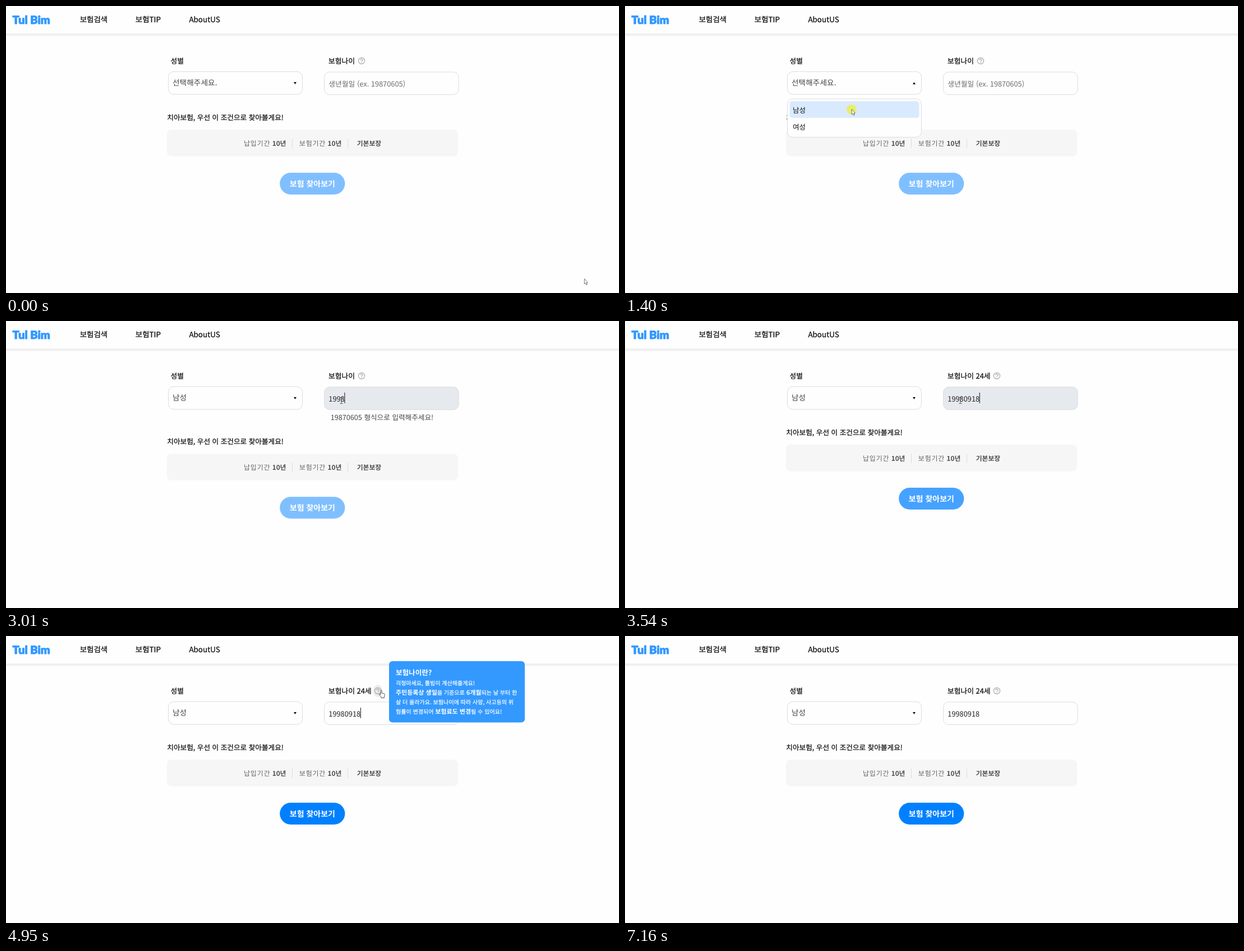
An HTML page for the animation above (7430 ms loop, 1093x513 px).

```html
<!DOCTYPE html>
<html lang="ko">
<head>
<meta charset="utf-8">
<title>보험검색</title>
<style>
  html, body { margin: 0; width: 100%; height: 100%; overflow: hidden; background: #fefefe; }
  svg { display: block; width: 1093px; height: 513px; }
  text {
    font: 12.63px "Noto Sans CJK KR", "Noto Sans KR", sans-serif;
    fill: #111; white-space: pre; text-rendering: geometricPrecision;
  }
  .logo { font: 900 20px Lato, sans-serif; fill: #39f; stroke: #39f; stroke-width: .9; stroke-linejoin: round; }
  .nav, .label, .lead { stroke: #111; stroke-width: .25; }
  .nav { font-size: 13.45px; }
  .label { font-size: 12.8px; }
  .choice { font-size: 13.6px; letter-spacing: .13px; fill: #444; }
  .field { fill: #fefefe; stroke: #dcdcdc; }
  .term { font-size: 12px; letter-spacing: .8px; fill: #666; }
  .value { font-size: 11.8px; font-weight: 700; fill: #4c4c4c; }
  .find { font-size: 14px; font-weight: 700; fill: #fff; text-anchor: middle; }
  #birth { font-size: 12.8px; }
  #hint { fill: #444; }
  #tip text { font-size: 10.06px; fill: #fff; stroke: #fff; stroke-width: .2; }
  #tip .title { font-size: 12.6px; font-weight: 700; stroke: none; }
  #tip tspan { font-size: 11px; font-weight: 700; stroke: none; }
  #tip { transform-origin: 683px 100px; }
</style>
</head>
<body>
<svg viewBox="0 0 1093 513">
  <defs>
    <linearGradient id="shade" x2="0" y2="1">
      <stop stop-color="#e8e8e8"/><stop offset="1" stop-color="#fefefe"/>
    </linearGradient>
  </defs>

  <rect y="49.5" width="1093" height="5.5" fill="url(#shade)"/>
  <text class="logo" x="11.5" y="31.8">Tul Bim</text>
  <text class="nav" x="131.7" y="28.8">보험검색</text>
  <text class="nav" x="230.8" y="28.8">보험TIP</text>
  <text class="nav" x="326.4" y="28.8">AboutUS</text>

  <text class="label" x="293.5" y="102.6">성별</text>
  <rect id="select" class="field" x="289.5" y="117.3" width="239" height="40.7" rx="9.5"/>
  <text id="gender" class="choice" x="296.9" y="142.3"></text>
  <path id="arrow" fill="#111"/>

  <text id="ageLabel" class="label" x="574.9" y="102.6"></text>
  <g id="help">
    <ellipse id="halo" rx="8" ry="11" fill="#000" opacity=".07"/>
    <circle r="5.6" fill="none" stroke="#aaa" stroke-width="1.2"/>
    <path d="M-2-1.2C-2-4 2-4 2-1.3C2 0 0 0 0 1.6M0 2.5V3.7" fill="none" stroke="#aaa" stroke-width="1.2"/>
  </g>
  <rect id="input" class="field" x="567.6" y="118" width="239.5" height="40.5" rx="9.5"/>
  <text id="birth" x="575.3" y="143.6"></text>
  <rect id="caret" y="128" width="1" height="19" fill="#111"/>
  <text id="hint" x="578.8" y="177.4">19870605 형식으로 입력해주세요!</text>

  <g id="lower">
    <text class="lead" x="287.3" y="203.6">치아보험, 우선 이 조건으로 찾아볼게요!</text>
    <rect x="287" y="221" width="519" height="47.5" rx="8" fill="#f6f6f6"/>
    <text class="term" x="424" y="249.9">납입기간</text>
    <text class="value" x="474.7" y="249.9">10년</text>
    <text class="term" x="522.8" y="249.9">보험기간</text>
    <text class="value" x="573.5" y="249.9">10년</text>
    <text class="value" x="625.7" y="249.9">기본보장</text>
    <path d="M510.5 237v17M609.5 237v17" stroke="#ddd"/>
    <rect id="button" x="488.2" y="298" width="116.2" height="39" rx="19.5"/>
    <text class="find" x="546.4" y="323">보험 찾아보기</text>
  </g>

  <g id="menu">
    <rect class="field" x="289.5" y="166" width="239" height="68.5" rx="9.5"/>
    <rect id="option" x="293.5" y="170" width="231" height="30" rx="5" fill="#daeafe"/>
    <text x="299" y="190.6">남성</text>
    <text x="299" y="220.6">여성</text>
  </g>

  <g id="tip">
    <rect x="683" y="45" width="242" height="109.5" rx="6" fill="#39f"/>
    <text class="title" x="694.9" y="70.4">보험나이란?</text>
    <text x="694.9" y="88.3">걱정마세요, 툴빔이 계산해줄게요!</text>
    <text x="694.9" y="105.1"><tspan>주민등록상 생일</tspan>을 기준으로 <tspan>6개월</tspan>되는 날 부터 한</text>
    <text x="694.9" y="122">살 더 올라가요. 보험나이에 따라 사망, 사고등의 위</text>
    <text x="694.9" y="138.8">험률이 변경되어 <tspan>보험료도 변경</tspan>될 수 있어요!</text>
  </g>

  <g id="cursor">
    <circle id="click" cy="1" r="9" fill="#e9ee5c" opacity=".9"/>
    <path id="pointer" d="M.3.5V10L2.4 8.1L3.8 11.5L5.3 10.8L3.9 7.6H6.4Z" fill="#fff" stroke="#555" stroke-width=".8"/>
    <path id="beam" d="M-2.5-5.5H-.5L0-5L.5-5.5H2.5M0-5V5M-2.5 5.5H-.5L0 5L.5 5.5H2.5" fill="none" stroke="#555"/>
    <path id="hand" d="M-1 8V1.2C-1-.2 1-.2 1 1.2V5L5 6C6.2 6.3 6.4 7 6.2 8.2L5.4 11V13.5H-.2V11.8L-3.3 8C-4 6.6-2.6 6.2-1 8Z" fill="#fff" stroke="#444" stroke-width=".9"/>
  </g>
</svg>
<script>
const LOOP = 7430;
const BIRTH = "19980918";
const KEY_TIMES = [2540, 2740, 2880, 3010, 3075, 3140, 3340, 3480];
const FOCUS = 1870, DONE = 3480, BLINK = 525;
const PATH = [ // time, x, y
  [0, 1031, 487], [600, 420, 142], [800, 420, 142], [1070, 404, 184], [1530, 404, 184],
  [1700, 560, 161], [1840, 598, 142], [4340, 598, 142], [4550, 673, 119], [4700, 669, 97],
  [6620, 669, 97], [6630, 700, 147], [6890, 968, 520]
];

const ui = {};
document.querySelectorAll("[id]").forEach(el => ui[el.id] = el);

const clamp = v => Math.min(1, Math.max(0, v));
const smooth = v => v * v * (3 - 2 * v);
const progress = (t, start, length) => smooth(clamp((t - start) / length));
const between = (v, a, b) => v >= a && v < b;
const show = (el, on) => el.setAttribute("visibility", on ? "visible" : "hidden");
const move = (el, x, y) => el.setAttribute("transform", `translate(${x} ${y})`);
const write = (el, s) => { if (el.textContent !== s) el.textContent = s; };

function cursorAt(t) {
  const i = PATH.findIndex(p => p[0] > t);
  if (i < 0) return PATH.at(-1).slice(1);
  const [t0, x0, y0] = PATH[i - 1], [t1, x1, y1] = PATH[i];
  const k = t0 >= 6630 ? (t - t0) / (t1 - t0) : progress(t, t0, t1 - t0);
  return [x0 + (x1 - x0) * k, y0 + (y1 - y0) * k];
}

function drawForm(t, x, y) {
  const open = between(t, 670, 1530);
  const typed = KEY_TIMES.filter(k => k <= t).length;
  const hinting = typed > 0 && t < DONE;
  const done = t >= DONE;

  write(ui.gender, t < 1530 ? "선택해주세요." : "남성");
  ui.arrow.setAttribute("d", open ? "M513 140h5l-2.5-4z" : "M513 136h5l-2.5 4z");
  ui.select.style.fill = between(x, 289, 529) && between(y, 117, 158) ? "#e6e9ee" : "";
  show(ui.menu, open);
  show(ui.option, open && y > 170);

  write(ui.ageLabel, done ? "보험나이 24세" : "보험나이");
  move(ui.help, done ? 663 : 634, 98);
  write(ui.birth, typed ? BIRTH.slice(0, typed) : "생년월일 (ex. 19870605)");
  ui.birth.style.fill = typed ? "#222" : "#6c6c6c";

  const lastInput = typed ? KEY_TIMES[typed - 1] : FOCUS;
  ui.caret.setAttribute("x", 575 + 7.1 * typed);
  show(ui.caret, t >= FOCUS && Math.floor((t - lastInput) / BLINK) % 2 === 0);

  show(ui.hint, hinting);
  move(ui.lower, 0, hinting ? 16.2 : 0);
  const k = 1 - progress(t, DONE, 130);
  ui.button.setAttribute("fill", `rgb(${128 * k},${128 + 63 * k},255)`);
}

function drawTip(t) {
  const leaving = t > 6640;
  const opacity = leaving ? 1 - progress(t, 6640, 200) : progress(t, 4690, 200);
  const grown = leaving ? 1 - progress(t, 6707, 133) : progress(t, 4690, 133);
  const scale = .75 + .25 * grown;
  ui.tip.style.opacity = opacity;
  ui.tip.style.transform = `scale(${scale}, ${scale * scale})`;
  show(ui.halo, between(t, 4640, 6690));
}

function drawCursor(t, x, y) {
  const visible = t < 5420 || between(t, 6630, 6890);
  const onHelp = t < 6000 && Math.hypot(x - 663, y - 98) < 12;
  const onInput = !onHelp && between(x, 567, 807) && between(y, 118, 159);
  const clicking = between(t, 600, 790) || between(t, 1400, 1530) || between(t, FOCUS, 2060);
  ui.input.style.fill = onInput && t < 6000 ? "#e6e9ee" : "";
  move(ui.cursor, x, y);
  show(ui.click, visible && clicking);
  show(ui.hand, visible && onHelp);
  show(ui.beam, visible && onInput);
  show(ui.pointer, visible && !onHelp && !onInput);
}

function frame() {
  const t = performance.now() % LOOP;
  const [x, y] = cursorAt(t);
  drawForm(t, x, y);
  drawTip(t);
  drawCursor(t, x, y);
  requestAnimationFrame(frame);
}
frame();
</script>
</body>
</html>
```
